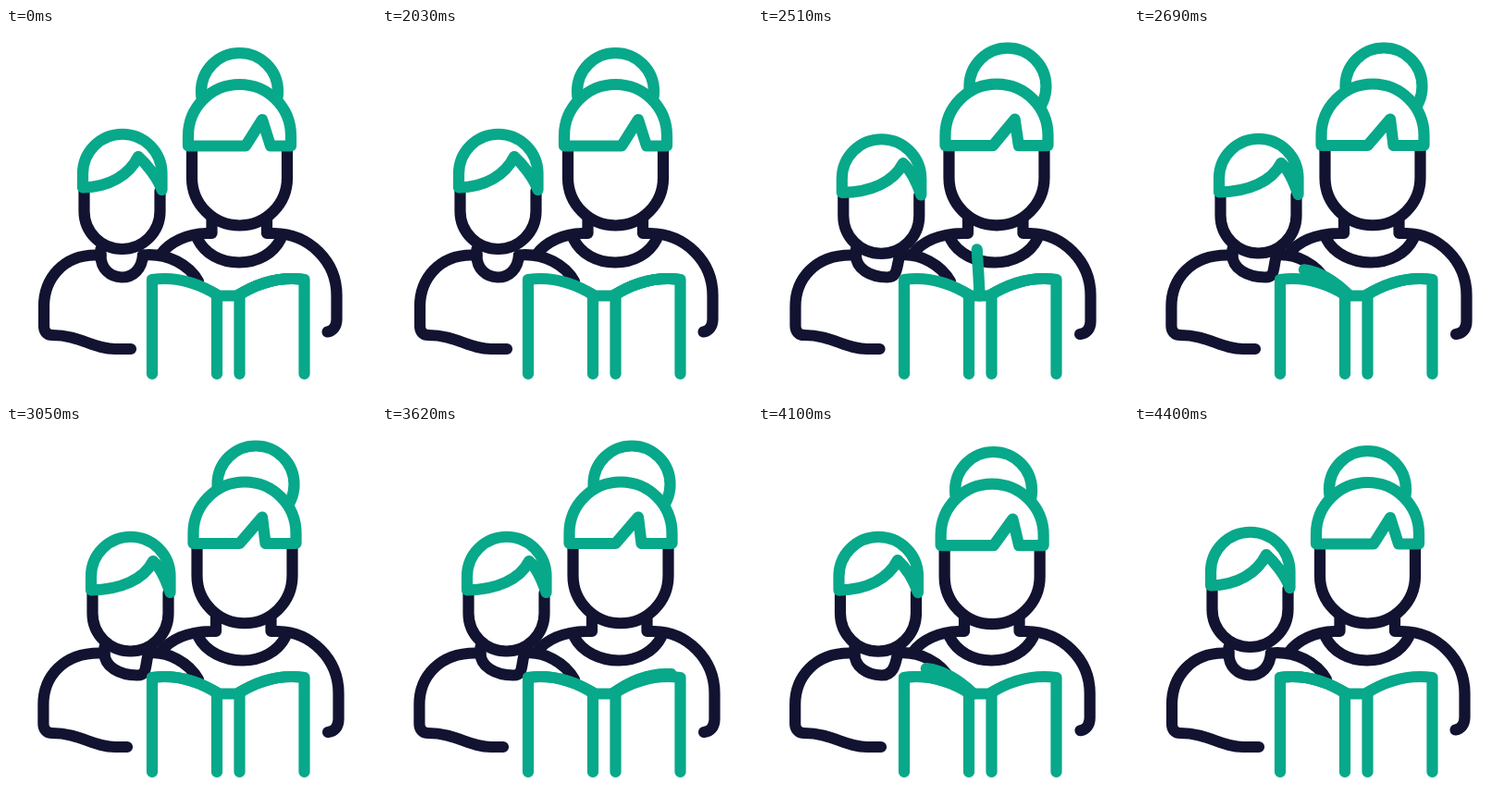
These frames come from a looping animation (400x400 px, 4.43 s). An HTML page with a canvas:

```html
<!DOCTYPE html>
<html lang="en">
<head>
<meta charset="utf-8">
<title>Reading together</title>
<style>
html, body { margin: 0; width: 100%; height: 100%; overflow: hidden; background: #fff; }
canvas { display: block; width: 400px; height: 400px; }
</style>
</head>
<body>
<canvas id="stage" width="400" height="400"></canvas>
<script>
const ctx = document.getElementById('stage').getContext('2d');
const INK = '#121331', GREEN = '#08a88a';
const LOOP = 4430, REST = 2030;

const clamp = v => Math.min(1, Math.max(0, v));
const ramp = (t, a, b) => clamp((t - a) / (b - a));
const smooth = u => u * u * (3 - 2 * u);
const mix = (a, b, u) => a + (b - a) * u;

// Pose weight: rises during the first span, falls back during the second.
const hold = (t, a, b, c, d) => smooth(ramp(t, a, b)) - smooth(ramp(t, c, d));
const bump = (t, a, b) => Math.sin(Math.PI * ramp(t, a, b)) ** 2;

function line(color, d) {
  ctx.strokeStyle = color;
  ctx.stroke(new Path2D(d));
}

function at(x, y, draw) {
  ctx.save();
  ctx.translate(x, y);
  draw();
  ctx.restore();
}

function drawMotherBody(lean, sway) {
  const neckL = 222.5 + 4.5 * lean, neckR = 282 + 4.5 * lean;
  const arm = 357.5 + 2 * lean + 2.5 * sway;
  const handX = 347.5 + .5 * lean + 2.5 * sway, handY = 328.5 + 2.5 * lean + sway;
  line(INK, `M${neckL} 206V222H${neckL - 6}C196 222.5 177 231 167 245`);
  line(INK, `M${neckR} 206V222H${neckR + 8}C${arm - 30} 222.5 ${arm} 252 ${arm} 289V${handY - 14}
    C${arm} ${handY - 6} ${arm - 4} ${handY - 1} ${handX} ${handY}`);
  const mid = 252 + 4 * lean, left = 207 + lean, right = 297 + 5 * lean;
  line(INK, `M${left} 228C${left + 8} 244 ${mid - 20} 253.5 ${mid} 253.5
    S${right - 8} 244 ${right} 228`);
}

function drawKidBody(lean, sway) {
  const neckL = 102.5 + 4 * lean, neckR = 148 + 6 * lean;
  const arm = 41 - .6 * lean - 1.4 * sway;
  line(INK, `M${neckL} 245.5H${neckL - 6}C62 245.5 ${arm} 271 ${arm} 301V322
    C${arm} 328 44 332 50 332C80 332 94 347 118 347H${135 - 4 * lean}`);
  line(INK, `M${neckR} 245.5C175 243 198 256 208 274`);
  line(INK, `M${neckL} 239V246C${neckL} 260 ${mix(112, 122, lean)} 269 ${mix(125, 142, lean)} 269.5
    C${mix(138, 153, lean)} 269.5 ${mix(147, 150, lean)} 260 ${neckR} 245.5`);
}

function drawMotherHead(turn, fringe, dip) {
  const x = 5.5 * turn, y = 4.2 * dip - .5 * turn;
  at(x, y * .45, () => line(INK, 'M201 130V162A51.5 51.5 0 0 0 304 162V130'));
  at(x, y, () => {
    ctx.beginPath();
    ctx.arc(252.5 + 12 * turn, 68.5 - 5 * turn, 41.5, 0, 7);
    ctx.strokeStyle = GREEN;
    ctx.stroke();
    // The hair hides the lower part of the bun.
    ctx.fillStyle = '#fff';
    ctx.fill(new Path2D('M197 127V116.5A55.5 55.5 0 0 1 308 116.5V127Z'));
    line(GREEN, `M197 127.5V116.5A55.5 55.5 0 0 1 308 116.5V127.5
      H${286 - 11 * fringe}L${277 - 5.5 * fringe} 99L${259 - 12 * fringe} 127.5Z`);
  });
}

function drawKidHead(turn, dip) {
  const x = 9 * turn, y = 5 * turn + 2.6 * dip;
  at(x, y * .9, () => line(INK, 'M84.5 176V198A41 41 0 0 0 166.5 198V176'));
  const px = 143 + 7 * turn, py = 139 + 2 * turn;
  at(x, y, () => line(GREEN, `M168.5 175V157.5A42.7 42.7 0 0 0 83 157.5V172.5
    C${112 + 3 * turn} 172 ${px - 10} ${py + 20} ${px} ${py}C${px + 9} ${py + 8} 164 162 168.5 175`));
}

const PAGE_RIGHT = [250, 289.5, 270, 277, 295, 268, 322, 272];
const PAGE_UP = [240, 289.5, 240, 273, 240, 255, 240, 238];
const PAGE_LEFT = [230, 289.5, 210, 277, 185, 268, 158, 272];

function pagePath(from, to, u) {
  const [x, y, ...curve] = from.map((v, i) => mix(v, to[i], u));
  return `M${x} ${y}C${curve}`;
}

function drawPage(t, start) {
  const rise = ramp(t, start, start + 400), fall = ramp(t, start + 400, start + 800);
  line(GREEN, fall > 0
    ? pagePath(PAGE_UP, PAGE_LEFT, 1 - (1 - fall) ** 1.8)
    : pagePath(PAGE_RIGHT, PAGE_UP, rise ** 1.8));
}

function drawBook(t) {
  line(GREEN, 'M158 374V272C185 268 210 277 230 289.5H250C270 277 295 268 322.5 272V374');
  line(GREEN, 'M228 290V374M252.5 290V374');
  drawPage(t, 72);
  drawPage(t, 1472);
}

function draw(t) {
  ctx.fillStyle = '#fff';
  ctx.fillRect(0, 0, 400, 400);
  ctx.lineWidth = 12.2;
  ctx.lineCap = ctx.lineJoin = 'round';

  const turn = hold(t, 0, 500, 1600, 2200);
  const fringe = hold(t, 60, 600, 1780, 2300);
  const kidTurn = hold(t, 20, 620, 1800, 2340);
  const dip = bump(t, 0, 500) + bump(t, 1600, 2200);
  const kidDip = bump(t, 20, 620) + bump(t, 1800, 2340);

  drawMotherBody(turn, dip);
  drawKidBody(kidTurn, dip);
  drawMotherHead(turn, fringe, dip);
  drawKidHead(kidTurn, kidDip);
  drawBook(t);
}

function tick() {
  draw(performance.now() % LOOP - REST);
  requestAnimationFrame(tick);
}
tick();
</script>
</body>
</html>
```
